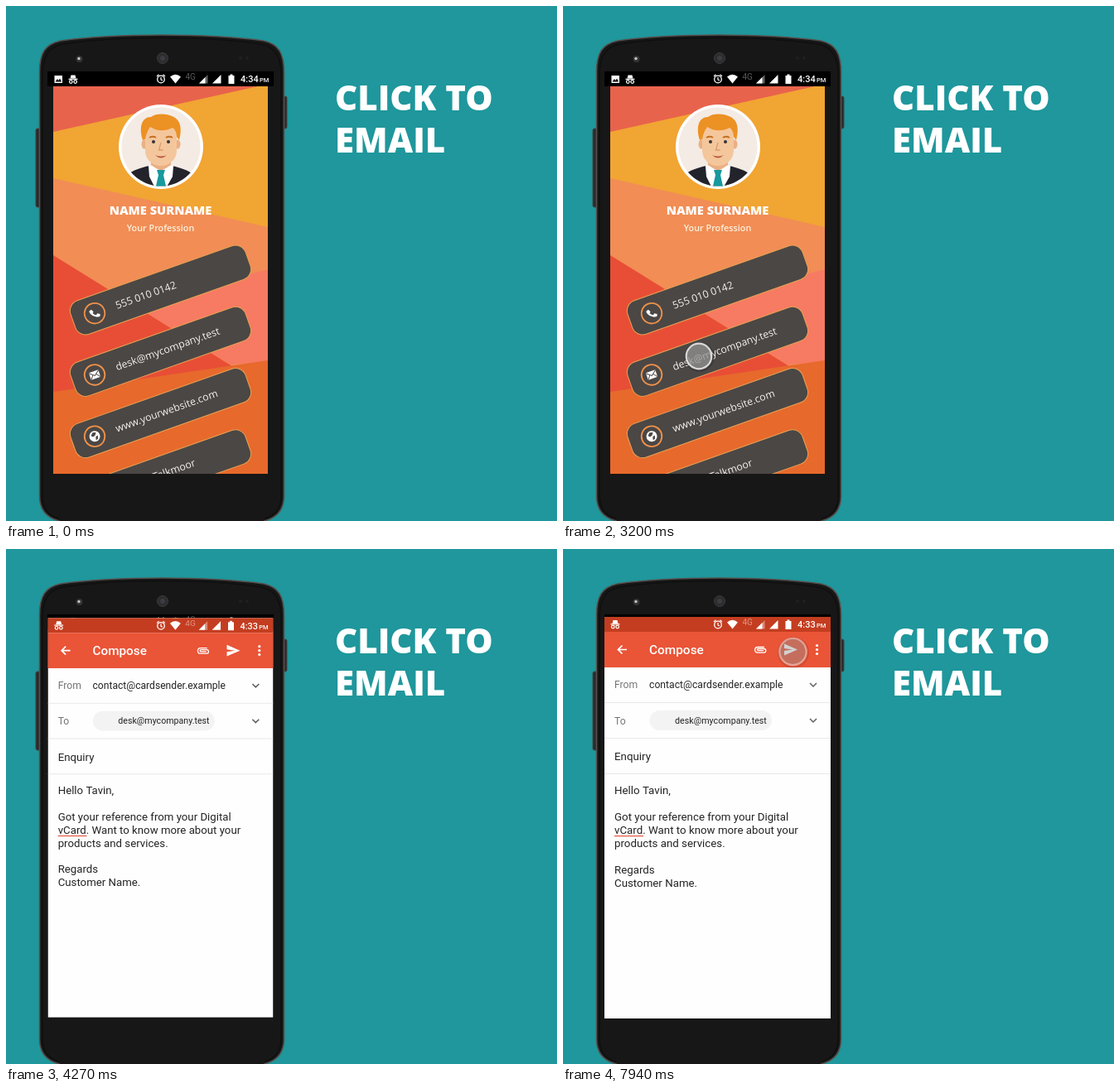
Recreate the animation shown at these times as an HTML page with a canvas. Size 665 px wide and 622 px high, loop 8000 ms.

```html
<!DOCTYPE html>
<html lang="en">
<head>
<meta charset="utf-8">
<title>Click to email</title>
<style>
  html, body { margin: 0; width: 100%; height: 100%; overflow: hidden; background: #1f979c; }
  canvas { display: block; }
</style>
</head>
<body>
<canvas id="stage" width="665" height="622"></canvas>
<script>
const c = document.getElementById('stage').getContext('2d');
const LOOP = 8000;
const TILT = -19.5 * Math.PI / 180;
const SANS = '"Open Sans", sans-serif';
const ROBOTO = 'Roboto, sans-serif';

const clamp = v => Math.max(0, Math.min(1, v));
const span = (t, a, b) => clamp((t - a) / (b - a));
const smooth = u => u * u * (3 - 2 * u);
const inOut = u => u < 0.5 ? 4 * u ** 3 : 1 - 4 * (1 - u) ** 3;

function rect(x, y, w, h, fill) {
  c.fillStyle = fill;
  c.fillRect(x, y, w, h);
}
function poly(fill, ...p) {
  c.beginPath();
  for (let i = 0; i < p.length; i += 2) c.lineTo(p[i], p[i + 1]);
  c.closePath();
  paint(fill);
}
function disc(x, y, r, fill, stroke, width) {
  c.beginPath();
  c.arc(x, y, r, 0, Math.PI * 2);
  paint(fill, stroke, width);
}
function oval(x, y, rx, ry, fill) {
  c.beginPath();
  c.ellipse(x, y, rx, ry, 0, 0, Math.PI * 2);
  paint(fill);
}
function round(x, y, w, h, r, fill, stroke, width) {
  c.beginPath();
  c.roundRect(x, y, w, h, r);
  paint(fill, stroke, width);
}
function path(d, fill, stroke, width) {
  const p = new Path2D(d);
  if (fill) { c.fillStyle = fill; c.fill(p); }
  if (stroke) { c.strokeStyle = stroke; c.lineWidth = width; c.stroke(p); }
}
function paint(fill, stroke, width) {
  if (fill) { c.fillStyle = fill; c.fill(); }
  if (stroke) { c.strokeStyle = stroke; c.lineWidth = width; c.stroke(); }
}
function text(s, x, y, font, fill, align = 'left') {
  c.font = font;
  c.fillStyle = fill;
  c.textAlign = align;
  c.fillText(s, x, y);
}
function at(x, y, angle, draw) {
  c.save();
  c.translate(x, y);
  c.rotate(angle);
  draw();
  c.restore();
}

function phone() {
  round(36, 148, 6, 95, 2, '#2b2b2b', '#454545', 1);
  round(334, 109, 5, 39, 2, '#2b2b2b', '#454545', 1);
  path('M40.5 80C40.5 57 47 46 66 42C105 36.500 146 35 188 35' +
       'C230 35 271 36.500 311 42C329 46 335.500 57 335.500 80' +
       'V592C335.500 608 327 618 312 622L300 630H78L64 622C49 618 40.500 608 40.500 592Z',
       '#171717', '#55504e', 1.6);
  path('M44 84C44 62 50 50 68 46C107 40 147 38.500 188 38.500' +
       'C229 38.500 269 40 308 46C326 50 332 62 332 84V592C332 607 324 616 312 619' +
       'M64 619C52 616 44 607 44 592V84', null, '#0f0f0f', 1.5);
  disc(189, 63, 6.5, '#2d2d2f', '#3b3b3d', 1);
  disc(189, 63, 3, '#3c3c42');
  disc(88.5, 64, 4, '#343434');
  disc(88, 63.5, 1.7, '#c4c4c4');
  disc(283, 63, 2, '#202020');
  disc(291, 63, 2, '#202020');
  rect(50, 79, 273, 18, '#000');
}

function incognito(x, y) {
  poly('#fff', x - 3.5, y - 1, x - 2.5, y - 5, x + 2.5, y - 5, x + 3.5, y - 1);
  rect(x - 5.5, y - 0.8, 11, 1.2, '#fff');
  disc(x - 2.7, y + 3, 1.8, null, '#fff', 1.2);
  disc(x + 2.7, y + 3, 1.8, null, '#fff', 1.2);
}

function signal(x, y, size) {
  poly('#fff', x, y, x + size, y, x + size, y - size);
}

function statusIcons(y, time, faint) {
  disc(187, y + 0.5, 4.3, null, '#fff', 1.3);
  path(`M187 ${y - 2}V${y + 1}L189 ${y + 2}M182 ${y - 3}l2.500-2.200M192 ${y - 3}l-2.500-2.200`,
       null, '#fff', 1.2);
  path(`M198 ${y - 2.5}Q204.500 ${y - 8} 211 ${y - 2.5}L204.500 ${y + 5.5}Z`, '#fff');
  text('4G', 216.5, y + 1, '10px ' + ROBOTO, faint);
  poly('rgba(255,255,255,.4)', 233, y + 5.5, 243.5, y + 5.5, 243.5, y - 5);
  signal(233, y + 5.5, 7.5);
  signal(249, y + 5.5, 10.5);
  rect(268.5, y - 4, 7, 10, '#fff');
  rect(270.5, y - 5.5, 3, 2, '#fff');
  text(time, 283, y + 4.3, '500 11px ' + ROBOTO, '#fff');
  text('PM', 306, y + 4.3, '500 7.5px ' + ROBOTO, '#fff');
}

function avatar() {
  disc(187, 170, 51, '#fff');
  c.save();
  c.beginPath();
  c.arc(187, 170, 47.5, 0, Math.PI * 2);
  c.clip();
  rect(136, 119, 102, 102, '#f3ebe4');
  path('M140 222C142 203 151 198 173 193H200C222 198 231 203 234 222Z', '#23232c');
  poly('#fff', 172, 193, 202, 193, 201, 206, 192, 222, 181, 222, 173, 206);
  poly('#eab083', 175, 180, 199, 180, 199, 192, 187, 200, 175, 192);
  poly('#fff', 172, 192, 187, 199, 178, 208);
  poly('#fff', 202, 192, 187, 199, 196, 208);
  poly('#17999e', 182, 198, 192, 198, 190, 204, 194, 222, 180, 222, 184, 204);
  oval(167, 167, 3.5, 5.5, '#eab083');
  oval(207, 167, 3.5, 5.5, '#eab083');
  path('M168 146H206V176C205 186 197 193 187 193C177 193 169 186 168 176Z', '#f4c69c');
  path('M165 162C160 146 164 134 175 134C183 128 202 130 208 139C212 145 211 155 209 162' +
       'L206 158C206 153 204 149 201 147C191 152 182 151 174 146C171 150 169 155 168 161Z', '#ec9123');
  path('M173 159q4.500-2.500 8 0M193 159q4-2.500 8 0', null, '#c56f22', 2);
  disc(178, 164, 2, '#35333a');
  disc(196, 164, 2, '#35333a');
  path('M187 165L184.500 174H189.500', null, '#dc9c6b', 1.3);
  path('M180 180Q187 183 194 180Q187 187 180 180Z', '#b9573e');
  c.restore();
}

const icons = [
  () => path('M-5.500-4.500L-2.500-5.500L-.8-2.200L-2.300-.8Q-.8 1.700 1.300 2.600' +
             'L2.800 1L6 3L4.800 5.600C1.500 7-6.500.5-5.500-4.500Z', '#fff'),
  () => {
    rect(-6, -4.5, 12, 9, '#fff');
    path('M-6-4L0 1L6-4M-6 4.500L-2-.5M6 4.500L2-.5', null, '#4b4745', 1);
  },
  () => {
    disc(0, 0, 6.5, '#fff');
    path('M-1-5L3-4L1-1L-2 0L-4-2ZM1 1L4 0L3 4L0 5Z', '#4b4745');
  },
  () => disc(0, 0, 6, '#fff')
];
const rows = ['555 010 0142', 'desk@mycompany.test', 'www.yourwebsite.com', 'Chat on Talkmoor'];

function card() {
  rect(58.5, 84, 9.5, 9, '#fff');
  poly('#000', 59.5, 91.5, 62, 88, 63.5, 90, 65, 87.5, 67, 91.5);
  incognito(81, 88.5);
  statusIcons(88, '4:34', '#5a5a5a');

  c.save();
  c.beginPath();
  c.rect(57, 97, 259, 468);
  c.clip();
  rect(57, 97, 259, 468, '#f18d55');
  poly('#f1a533', 57, 97, 316, 97, 316, 267, 57, 208);
  poly('#e8634c', 57, 97, 304, 97, 57, 152);
  poly('#f77a62', 316, 318, 154, 361, 271, 433, 316, 430);
  poly('#e84e36', 57, 301, 273, 435, 57, 467);
  poly('#e7692c', 57, 466, 316, 428, 316, 565, 57, 565);
  avatar();
  text('NAME SURNAME', 186.5, 252.3, '800 14.7px ' + SANS, '#fff', 'center');
  text('Your Profession', 186.5, 272, '600 10.8px ' + SANS, '#fdf0dc', 'center');
  rows.forEach((label, i) => at(186.5, 343 + i * 74.3, TILT, () => {
    round(-112, -21.5, 224, 43, 13, '#4b4745', '#e9a254', 1);
    disc(-84.3, 0, 12.3, null, '#f0924a', 1.8);
    at(-84.3, 0, 0, icons[i]);
    text(label, -57.2, 4.2, '12.3px ' + SANS, '#f4f2f0');
  }));
  c.restore();
}

function compose() {
  const ink = '#242424', grey = '#757575';
  rect(50, 82, 273, 485, '#fefefe');
  rect(50, 82, 273, 18, '#c43d20');
  rect(50, 100, 273, 43, '#ea5437');
  incognito(63, 91);
  statusIcons(91, '4:33', '#e39482');

  path('M77 121.500H66.500M71.500 116.500L66.500 121.500L71.500 126.500', null, '#fff', 1.7);
  text('Compose', 104, 127.3, '500 15.4px ' + ROBOTO, '#fff');
  path('M243 118.500H235a3.300 3.300 0 0 0 0 6.600H242.500a2.300 2.300 0 0 0 0-4.600H235.500' +
       'a1 1 0 0 0 0 2.200H242', null, '#fff', 1.3);
  poly('#fff', 267, 114.5, 283, 121.5, 267, 128.5, 267, 123, 277, 121.5, 267, 120);
  for (const y of [116.5, 121.5, 126.5]) disc(306.5, y, 1.6, '#fff');

  text('From', 62, 168.3, '12.2px ' + ROBOTO, grey);
  text('contact@cardsender.example', 104, 168.3, '12.2px ' + ROBOTO, ink);
  text('To', 62, 211.5, '12.2px ' + ROBOTO, grey);
  round(104.5, 195, 147.5, 24, 12, '#f3f3f3');
  text('desk@mycompany.test', 135, 210.5, '10.7px ' + ROBOTO, ink);
  for (const y of [164, 207]) path(`M298 ${y - 2}l4 4l4-4`, null, '#606060', 1.5);
  for (const y of [185, 228, 271]) rect(50, y, 273, 1, '#e8e8e8');

  const body = '13.3px ' + ROBOTO;
  text('Enquiry', 62, 255.3, body, ink);
  ['Hello Tavin,', '', 'Got your reference from your Digital', 'vCard. Want to know more about your',
   'products and services.', '', 'Regards', 'Customer Name.']
    .forEach((line, i) => text(line, 62, 296.3 + i * 15.9, body, ink));
  rect(62, 346, 35, 1.3, '#e4604d');
}

function pointer(x, y, scale, alpha) {
  c.save();
  c.globalAlpha = alpha;
  c.translate(x, y);
  c.scale(scale, scale);
  disc(0.5, 1, 16.8, null, 'rgba(0,0,0,.18)', 2.5);
  disc(0, 0, 15, 'rgba(145,145,145,.76)');
  disc(0, 0, 15.3, null, 'rgba(240,240,240,.85)', 2.2);
  c.restore();
}

// Moves from one spot to another, then swells briefly on the tap.
function tap(t, from, to, start, end, press, release, alpha) {
  const u = inOut(span(t, start, end));
  const swell = 1 + 0.35 * Math.sin(Math.PI * span(t, press, release));
  pointer(from[0] + (to[0] - from[0]) * u, from[1] + (to[1] - from[1]) * u, swell, alpha);
}

function draw(t) {
  rect(0, 0, 665, 622, '#1f979c');
  text('CLICK TO', 397, 126, '800 42px ' + SANS, '#fff');
  text('EMAIL', 397, 177, '800 42px ' + SANS, '#fff');
  phone();

  const open = smooth(span(t, 3857, 4290));
  if (open < 1) card();
  if (open > 0) {
    c.save();
    c.globalAlpha = Math.min(1, open * 0.9 + open ** 4 * 0.2);
    c.translate(186.5, 324.5);
    c.scale(open, open);
    c.translate(-186.5, -324.5);
    compose();
    c.restore();
  }

  if (t >= 1730 && t < 4200) {
    tap(t, [284, 532], [164, 423], 1730, 3230, 3600, 3900, 1 - span(t, 4020, 4200));
  } else if (t >= 6330) {
    tap(t, [142, 344], [277.5, 124], 6330, 7555, 7780, 7950, 1 - 0.45 * span(t, 7810, 7940));
  }
}

function tick() {
  draw(performance.now() % LOOP);
  requestAnimationFrame(tick);
}
tick();
</script>
</body>
</html>
```
